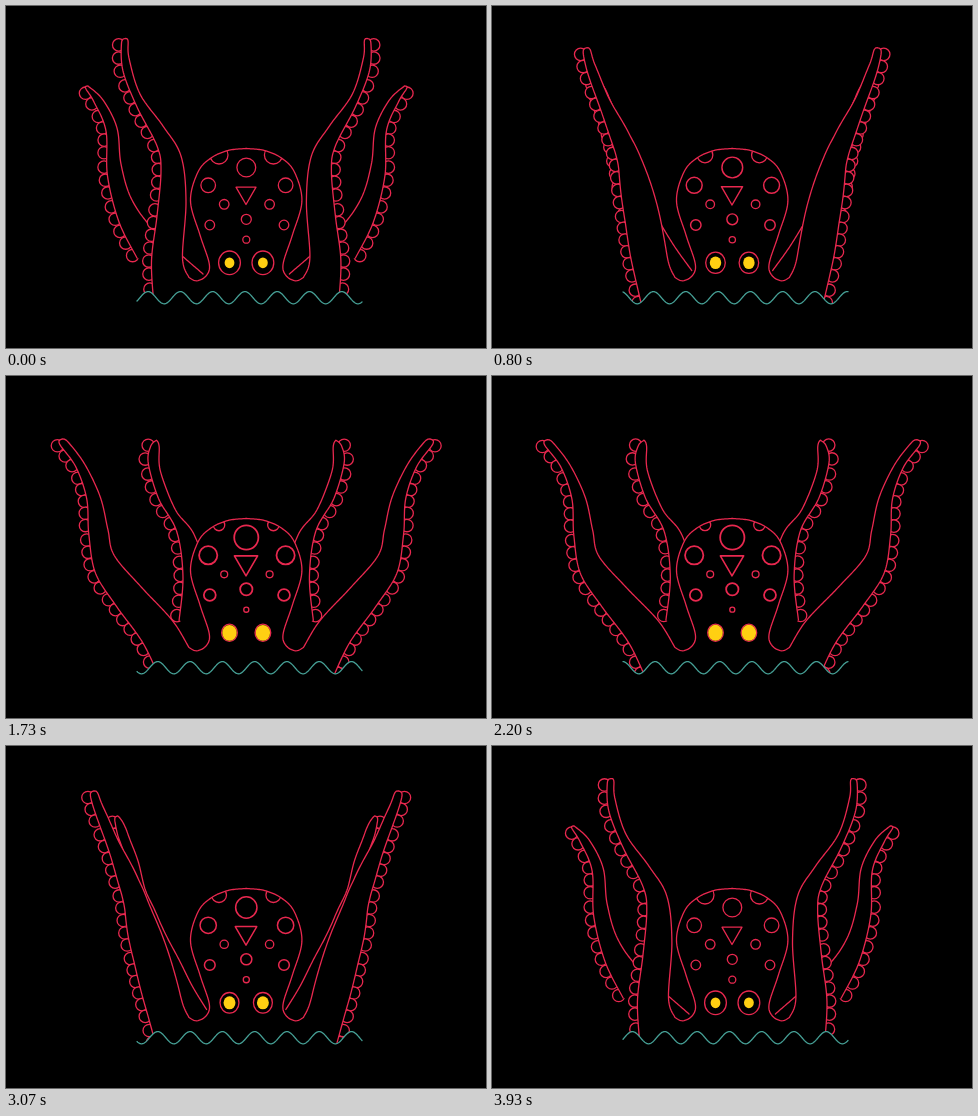
Animation of 480x342 px, one loop 3990 ms. Source, as an HTML page with a canvas:

```html
<!DOCTYPE html>
<html lang="en">
<head>
<meta charset="utf-8">
<title>Octopus</title>
<style>
  html, body { margin: 0; width: 100%; height: 100%; overflow: hidden; background: #000; }
  canvas { display: block; width: 480px; height: 342px; }
</style>
</head>
<body>
<canvas id="stage"></canvas>
<script>
const W = 480, H = 342, LOOP = 3990, STEP = 200 / 3, STEPS = 60;
const MIRROR = 480.4, THIN = 1.3;
const RED = '#e8284f', TEAL = '#46a096', YELLOW = '#ffcf12', BLACK = '#000';
const canvas = document.getElementById('stage');
const ctx = canvas.getContext('2d');
const dpr = window.devicePixelRatio || 1;
canvas.width = W * dpr;
canvas.height = H * dpr;

const N = 130;
const mix = (a, b, p) => a + (b - a) * p;
const mix2 = (a, b, p) => [mix(a[0], b[0], p), mix(a[1], b[1], p)];
const gap = (a, b) => Math.hypot(b[0] - a[0], b[1] - a[1]);

// Smooth curve through x,y pairs, resampled at N + 1 equal arc steps
function curve(...flat) {
  const count = flat.length / 2;
  const at = i => {
    const k = 2 * Math.max(0, Math.min(count - 1, i));
    return [flat[k], flat[k + 1]];
  };
  const dense = [at(0)], len = [0];
  for (let u = 1; u <= (count - 1) * 16; u++) {
    const i = Math.floor((u - 1) / 16), t = u / 16 - i;
    const [a, b, c, d] = [at(i - 1), at(i), at(i + 1), at(i + 2)];
    const q = [0, 1].map(k => b[k] + 0.5 * t * (c[k] - a[k] +
      t * (2 * a[k] - 5 * b[k] + 4 * c[k] - d[k] +
      t * (3 * b[k] - a[k] - 3 * c[k] + d[k]))));
    len.push(len[u - 1] + gap(dense[u - 1], q));
    dense.push(q);
  }
  const total = len[len.length - 1];
  let j = 1;
  return Array.from({ length: N + 1 }, (_, i) => {
    const want = total * i / N;
    while (j < len.length - 1 && len[j] < want) j++;
    return mix2(dense[j - 1], dense[j], (want - len[j - 1]) / (len[j] - len[j - 1]));
  });
}

// Each edge runs from tip to base in its raised and its spread pose;
// between the poses the tip sways by dx, dy and the middle swells sideways
const front = {
  dx: -2, dy: -2, suckers: 21,
  inner: {
    swell: 2.5,
    up: curve(119,32.5, 122,34.5, 123,52, 134,88, 157,120, 175,150, 180,195, 176.5,252, 183,271.5),
    out: curve(54,64.5, 60,68, 77,90, 92,122, 99,155, 105,181, 133,212, 166,245, 183,271.5)
  },
  outer: {
    swell: -2.5,
    up: curve(119,32.5, 115.5,37, 117,65, 131,101, 151,140, 155,165, 151,210, 145.5,255, 148,300),
    out: curve(54,64.5, 51,69.5, 68,92, 79,124, 80.5,160, 87,198, 109,231, 136,266, 153,300)
  }
};
const back = {
  dx: -2.5, dy: -3, suckers: 14,
  inner: {
    swell: 0,
    up: curve(82,80, 97,94, 111,122, 115,158, 126,194, 150,226, 197,268),
    out: curve(154,64, 156.5,70, 157,95, 172,133, 191,157, 203,196, 202,232, 205,258)
  },
  outer: {
    swell: 0,
    up: curve(82,80, 79.5,82, 88,96, 100,125, 101.5,170, 113,216, 131,252),
    out: curve(154,64, 148,70, 145,87, 155,122, 174,155, 180,200, 175,244)
  }
};
const head = curve(240,142.5, 222,144.5, 205,152, 192,166, 184.5,195, 194,229, 203.3,258,
  200,270, 190.5,274.8, 183,271.5);

function pose(arm, side, p) {
  const { up, out, swell } = arm[side];
  const w = 4 * p * (1 - p);
  return up.map((a, i) => {
    const s = i / N, [x, y] = mix2(a, out[i], p);
    return [x + w * (arm.dx * (1 - s) + swell * Math.sin(Math.PI * s)), y + w * arm.dy * (1 - s)];
  });
}

function trace(pts) {
  ctx.beginPath();
  pts.forEach(q => ctx.lineTo(q[0], q[1]));
}

function ring(x, y, rx, ry = rx, fill) {
  ctx.beginPath();
  ctx.ellipse(x, y, rx, ry, 0, 0, 2 * Math.PI);
  if (fill) { ctx.fillStyle = fill; ctx.fill(); }
  ctx.stroke();
}

function suckers(edge, count) {
  for (let i = 0; i < count; i++) {
    const k = Math.round((i + 0.65) / count * N);
    const a = edge[Math.max(0, k - 2)], b = edge[Math.min(N, k + 2)];
    const f = 2.7 / gap(a, b);
    ring(edge[k][0] - (b[1] - a[1]) * f, edge[k][1] + (b[0] - a[0]) * f, 6.2, 6.2, BLACK);
  }
}

function shape(pts, close = []) {
  trace(pts.concat(close));
  ctx.fillStyle = BLACK;
  ctx.fill();
  trace(pts);
  ctx.stroke();
}

function arm(a, p, start, close) {
  const outer = pose(a, 'outer', p);
  const line = start.concat(pose(a, 'inner', p).reverse(), outer);
  suckers(outer, a.suckers);
  shape(line, close);
}

function half(p) {
  ctx.lineWidth = THIN;
  arm(back, p, []);
  arm(front, p, head, [[240.3, 300]]);

  ring(223.5, 256.8, mix(10.9, 7.7, p), mix(11.8, 8.5, p));
  ctx.fillStyle = YELLOW;
  ctx.beginPath();
  ctx.ellipse(223.5, 256.8, mix(4.9, 7.3, p), mix(5.4, 8, p), 0, 0, 2 * Math.PI);
  ctx.fill();

  // spot cut off by the top of the head
  ctx.save();
  trace(head.concat([[240, 300]]));
  ctx.clip();
  ring(213, 149, mix(9, 5.6, p));
  ctx.restore();
}

// Spots: offset from the middle, height, radius raised and spread
const spots = [
  [0, 161.5, 9.4, 12.2], [38.7, 179.3, 7.3, 9.2], [22.7, 198.3, 4.8, 3.4],
  [0, 213.3, 5, 6.2], [37.1, 219, 4.8, 6], [0, 233.7, 3.5, 2.5]
];

function pattern(p) {
  for (const [off, y, r0, r1] of spots) {
    ctx.lineWidth = mix(THIN, r1 > r0 ? 1.8 : THIN, p);
    const mid = off ? 240.9 : 240.3;
    ring(mid - off, y, mix(r0, r1, p));
    if (off) ring(mid + off, y, mix(r0, r1, p));
  }
  ctx.lineWidth = mix(THIN, 1.6, p);
  const w = mix(10, 11.7, p), top = mix(181.2, 179.8, p);
  trace([[240 - w, top], [240 + w, top], [240, mix(198.5, 200, p)]]);
  ctx.closePath();
  ctx.stroke();
}

function water(turn) {
  const wave = [];
  for (let x = 131; x <= 356.5; x += 0.75) {
    wave.push([x, 291.7 - 6.1 * Math.cos(2 * Math.PI * ((x - 142) / 32.3 - 3 * turn))]);
  }
  ctx.strokeStyle = TEAL;
  ctx.lineWidth = THIN;
  shape(wave, [[357, H], [131, H]]);
}

function draw(ms) {
  const step = Math.min(STEPS - 1, Math.floor((ms % LOOP + 3.4) / STEP));
  const turn = step / STEPS;
  const p = (1 - Math.cos(2 * Math.PI * turn)) / 2;
  ctx.setTransform(dpr, 0, 0, dpr, 0, 0);
  ctx.fillStyle = BLACK;
  ctx.fillRect(0, 0, W, H);
  ctx.strokeStyle = RED;
  ctx.lineCap = ctx.lineJoin = 'round';
  half(p);
  ctx.save();
  ctx.translate(MIRROR, 0);
  ctx.scale(-1, 1);
  half(p);
  ctx.restore();
  pattern(p);
  water(turn);
}

const start = performance.now();
function tick() {
  draw(performance.now() - start);
  requestAnimationFrame(tick);
}
tick();
</script>
</body>
</html>
```
